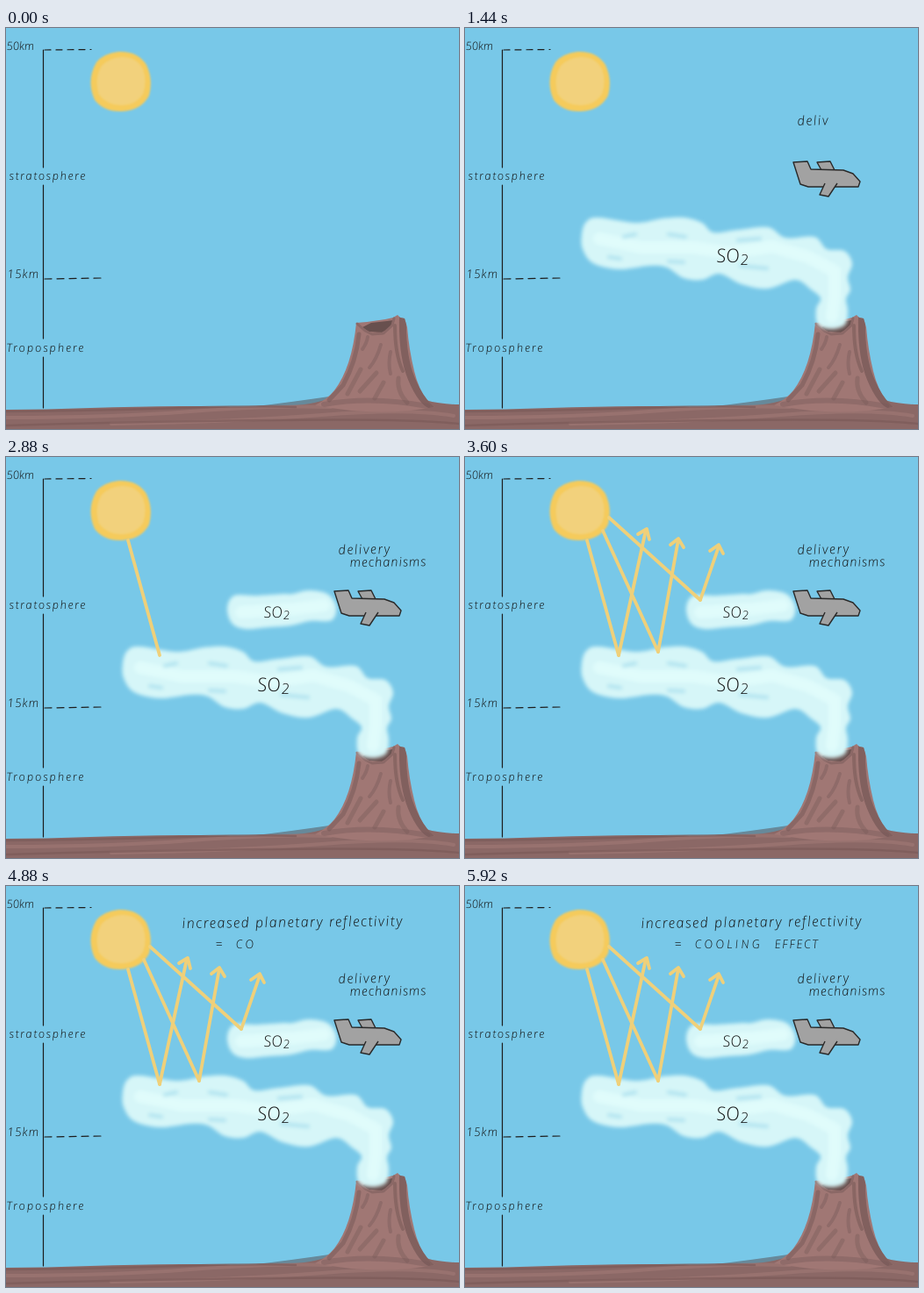
These frames come from a looping animation (516 by 457 pixels, 6000 ms). An HTML page:

```html
<!DOCTYPE html>
<html lang="en">
<head>
<meta charset="utf-8">
<title>Stratospheric aerosols</title>
<style>
  html, body { margin: 0; width: 100%; height: 100%; overflow: hidden; background: #78c8e8; }
  svg { display: block; width: 516px; height: 457px; }
  text { font-family: "Open Sans", "Noto Sans", sans-serif; font-style: italic; font-weight: 300; fill: #111; white-space: pre; }
  .ink { fill: none; stroke: #1c1c1c; stroke-width: 1.2; stroke-linecap: round; }
  .ray { fill: none; stroke: #efd07a; stroke-width: 3.8; stroke-linecap: round; stroke-linejoin: round; }
  .brush { fill: none; stroke-linecap: round; stroke-linejoin: round; }
</style>
</head>
<body>
<svg viewBox="0 0 516 457">
  <defs>
    <filter id="soft" x="-20%" y="-20%" width="140%" height="140%"><feGaussianBlur stdDeviation="2.3"/></filter>
    <filter id="edge" x="-20%" y="-20%" width="140%" height="140%"><feGaussianBlur stdDeviation="1.1"/></filter>
    <clipPath id="cone"><use href="#mountain"/></clipPath>
  </defs>
  <rect width="516" height="457" fill="#78c8e8"/>

  <g id="ground">
    <path d="M285 431Q320 427 368 420L378 430L300 434Z" fill="#67899a"/>
    <path d="M0 435C60 435 130 431 200 431S290 433 330 430Q362 427 376 418L478 424Q495 429 516 429V457H0Z" fill="#8b6866"/>
    <g class="brush" stroke="#9d7673" stroke-width="4" opacity=".75">
      <path d="M0 444Q120 444 210 437T370 432"/>
      <path d="M120 451Q260 449 360 441T510 442"/>
    </g>
    <g class="brush" stroke="#795957" stroke-width="2.5" opacity=".6">
      <path d="M0 437Q110 436 200 433T330 432"/>
      <path d="M0 453Q140 449 300 447T516 451"/>
    </g>
    <path id="mountain" d="M399 336L411 335L432 332L441 330L446 327L449 330L454 331L457 341Q459 366 465 391Q470 412 480 424L488 432Q425 444 352 430Q366 423 374 413Q394 387 399 336Z" fill="#a07774"/>
    <g clip-path="url(#cone)" class="brush" stroke="#775957">
      <path d="M452 330Q451 374 462 400T484 430" stroke-width="8" opacity=".75"/>
      <path d="M443 339Q443 372 452 391" stroke-width="4" opacity=".55"/>
      <path d="M402 349Q399 380 384 407L368 424" stroke-width="5" opacity=".5"/>
      <path d="M412 352Q411 359 406 366M427 361Q422 378 414 387M438 369Q435 382 438 394" stroke-width="4" opacity=".4"/>
      <path d="M404 389L389 417M422 393L403 414M447 399Q445 414 457 427M430 404L420 422" stroke-width="5" opacity=".38"/>
      <path d="M362 429Q416 419 480 431" stroke-width="6" opacity=".4"/>
    </g>
    <path d="M406 341L416 336L434 334L441 333L437 342L428 347L413 346Z" fill="#68504e"/>
    <path class="brush" d="M400 337L409 345L417 349L430 348L440 339L442 331" stroke="#8b6866" stroke-width="3"/>
  </g>

  <g filter="url(#edge)">
    <path d="M103 39Q111 29 128 27Q150 26 160 42Q168 59 163 77Q154 94 132 95Q112 96 101 82Q91 60 103 39Z" fill="#f5cb5b"/>
    <path d="M109 43Q118 34 132 33Q149 33 156 47Q161 61 156 75Q148 88 131 88Q115 88 106 76Q100 58 109 43Z" fill="#f2d17b"/>
  </g>

  <path class="ink" d="M42.5 25V159M42.5 179V354M42.5 375V433"/>
  <path class="ink" d="M44 25L97 24.5" stroke-dasharray="7 6"/>
  <path class="ink" d="M44 286L108 285" stroke-dasharray="8 6"/>

  <g id="scene"></g>
</svg>
<script>
const LOOP = 6000, STEP = 80;
const scene = document.getElementById("scene");
const cues = [], typed = [];

function add(tag, attrs, parent = scene) {
  const node = document.createElementNS("http://www.w3.org/2000/svg", tag);
  for (const key in attrs) node.setAttribute(key, attrs[key]);
  return parent.appendChild(node);
}

function cue(from, to = LOOP) {
  const node = add("g", {});
  cues.push({ node, from, to });
  return node;
}

function write(str, x, y, size, spacing = 0, tilt = 0, parent = scene) {
  const node = add("text", {
    transform: `translate(${x} ${y}) rotate(${tilt}) skewX(6)`,
    "font-size": size, "letter-spacing": spacing
  }, parent);
  node.textContent = str;
  return node;
}

// Reveals a text evenly over a number of steps.
function type(str, start, steps, ...place) {
  typed.push({ node: write("", ...place), str, start, steps });
}

// Closed smooth curve through the points.
function blob(points) {
  const n = points.length, at = i => points[(i + n) % n];
  let d = "M" + points[0];
  for (let i = 0; i < n; i++) {
    const [a, b, c, e] = [at(i - 1), at(i), at(i + 1), at(i + 2)];
    const p = [0, 1].map(k => b[k] + (c[k] - a[k]) / 6);
    const q = [0, 1].map(k => c[k] - (e[k] - b[k]) / 6);
    d += `C${p} ${q} ${c}`;
  }
  return d + "Z";
}

function cloud(parent, points, wisps = "", core = "") {
  const g = add("g", { filter: "url(#soft)", class: "brush" }, parent);
  add("path", { d: blob(points), fill: "#d6f6f8" }, g);
  add("path", { d: core, stroke: "#e0fcfb", "stroke-width": 14 }, g);
  add("path", { d: wisps, stroke: "#b3e4f0", "stroke-width": 4.5 }, g);
}

function so2(parent, x, y, size, drop) {
  write("SO", x, y, size, 0, 0, parent);
  write("2", x + size * 1.25, y + drop, size * .78, 0, 0, parent);
}

write("50km", 1, 25, 13);
write("stratosphere", 4, 173, 13, 1.7);
write("15km", 2, 285, 13.5, 1);
write("Troposphere", 1, 369, 13, 2);

const plume = [
  [310, 230], [345, 227], [365, 239], [398, 238], [412, 252], [432, 254], [441, 268],
  [436, 284], [439, 298], [434, 309], [436, 322], [433, 338], [418, 343], [402, 338],
  [400, 320], [405, 308], [394, 298], [376, 287], [345, 297], [315, 292],
  [290, 280], [270, 287], [249, 285], [230, 273], [210, 271], [175, 275], [146, 268],
  [134, 252], [133, 235], [138, 221], [152, 216], [195, 222], [225, 217], [250, 216],
  [270, 222], [283, 233]
];
const column = "M418 329L421 305L421 277L391 261L350 249L325 253";
cloud(cue(320, 640), plume.slice(0, 20), "M314 241L337 240", column);
cloud(cue(640), plume,
  "M181 238L194 235M232 235L251 238M164 261L177 263M232 266L249 267M311 242L336 240M314 271L344 274",
  column + "L300 256L260 250L200 250L153 240");
so2(cue(800), 287, 267, 21.5, 3);

const haze = [
  [315, 156], [326, 156], [345, 152], [366, 156], [376, 170], [371, 186], [346, 187], [325, 192],
  [300, 194], [272, 196], [257, 189], [252, 172], [260, 158], [285, 158]
];
const hazeCore = "M362 169L330 173";
cloud(cue(2320, 2480), haze.slice(0, 8), "", hazeCore);
cloud(cue(2480), haze, "", hazeCore + "L268 177");
so2(cue(2640), 294, 183, 17.5, 2);

const plane = cue(960);
for (const d of [
  "M401 153L416 152L421 162L406 162Z",
  "M374 153L390 152L394 161L431 162L442 166L450 175L448 181L391 181L382 178Z",
  "M410 177L404 190L414 192L424 177"
]) add("path", { d, fill: "#a2a2a2", stroke: "#292929", "stroke-width": 1.4, "stroke-linejoin": "round" }, plane);

const rays = [
  { down: "M139 95L175 226", up: "M175 226L206 83", head: "M197 88L207 82L210 94" },
  { down: "M157 84L220 222", up: "M220 222L243 94", head: "M234 100L243 93L249 103" },
  { down: "M164 69L268 163", up: "M268 163L289 102", head: "M279 107L289 100L294 110" }
];
const ray = (parent, d) => add("path", { d, class: "ray" }, parent);
const firstRay = cue(2880), otherRays = cue(2960), bounce = cue(3280), heads = cue(3600);
rays.forEach((r, i) => {
  ray(i ? otherRays : firstRay, r.down);
  ray(bounce, r.up);
  ray(heads, r.head);
});

type("delivery", 1120, 8, 379, 111, 15, 1.6, -1);
type("mechanisms", 1760, 6, 392, 125, 14.5, 1.1, -.5);
type("increased planetary reflectivity", 3680, 13, 201, 48, 16, 1.55, -.6);
type("=", 4720, 1, 239, 71, 14);
type("COOLING", 4800, 7, 262, 71, 13.5, 3.3);
type("EFFECT", 5360, 6, 353, 70.5, 13.5, 1.6);

function draw(now) {
  const t = now % LOOP;
  for (const c of cues) c.node.style.display = t >= c.from && t < c.to ? "" : "none";
  for (const w of typed) {
    const done = Math.max(0, Math.min(w.steps, Math.floor((t - w.start) / STEP) + 1));
    const part = w.str.slice(0, Math.round(w.str.length * done / w.steps));
    if (w.node.textContent !== part) w.node.textContent = part;
  }
}

const begin = performance.now();
(function tick() {
  draw(performance.now() - begin);
  requestAnimationFrame(tick);
})();
</script>
</body>
</html>
```
